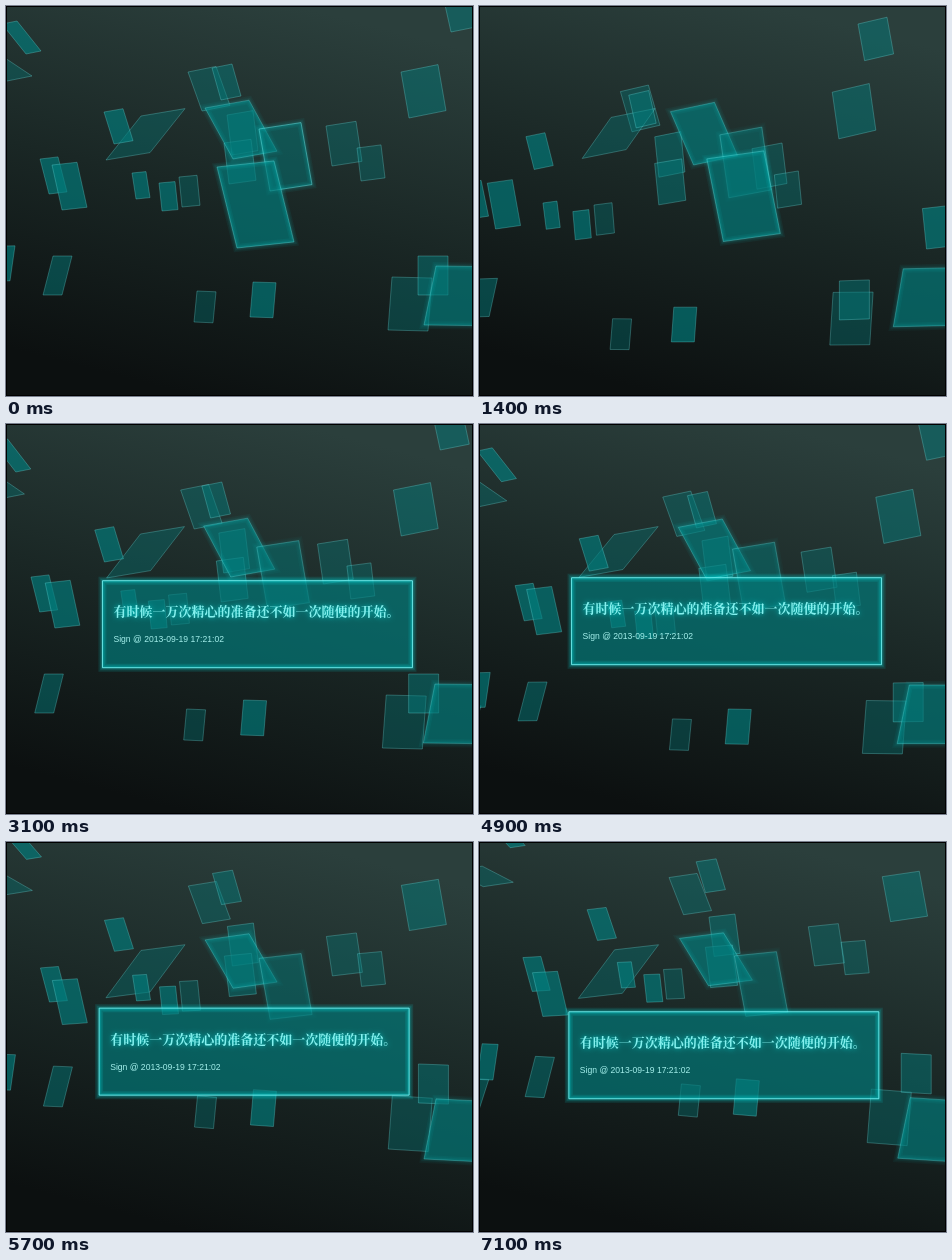
Write an HTML page with a canvas that moves like this. It is 467 px wide and 390 px high and loops after 7.4 s.

```html
<!DOCTYPE html>
<html lang="zh">
<head>
<meta charset="utf-8">
<title>Floating cards</title>
<style>
html, body { margin: 0; width: 100%; height: 100%; overflow: hidden; background: #000; }
canvas { display: block; }
</style>
</head>
<body>
<canvas id="stage" width="467" height="390"></canvas>
<script>
const W = 467, H = 390, LOOP = 7400, STEP = 100;
const ctx = document.getElementById('stage').getContext('2d');

// Tiles grouped by opacity: x, y, width, height, lean, depth
const groups = [
  { alpha: 0.35, tiles: [
    [173, 171, 18, 30, 3, 1], [182, 66, 28, 39, 14, 0.7], [320, 120, 30, 40, 6, 0.81],
    [351, 142, 24, 33, 4, 0.96], [135, 110, 44, 44, -35, 0.05], [191, 285, 19, 31, -3, 0.99],
    [386, 271, 40, 53, -4, 0.55], [-34, 56, 30, 20, 30, 0.63]] },
  { alpha: 0.46, tiles: [
    [395, 66, 37, 46, 8, 0.72], [206, 62, 20, 32, 9, 0.97],
    [221, 109, 26, 40, 5, 0.78], [218, 137, 27, 41, 5, 0.73], [412, 250, 30, 39, 0, 0.89],
    [437, -10, 29, 36, 8, 1], [47, 250, 19, 39, -10, 0.82], [-18, 273, 18, 34, -11, 0.85]] },
  { alpha: 0.64, tiles: [
    [-4, 18, 15, 30, 24, 0.9], [98, 106, 19, 32, 10, 0.88], [34, 153, 18, 35, 9, 0.86],
    [46, 159, 25, 45, 10, 0.65], [126, 167, 14, 26, 4, 1.07], [153, 177, 16, 28, 3, 1.02],
    [247, 276, 23, 35, -3, 0.9], [-7, 240, 16, 35, -5, 0.88], [484, 183, 30, 40, 5, 0.7],
    [199, 102, 44, 51, 28, 0.13], [430, 260, 54, 59, -12, 0.1]] }
];
const hovered = [253, 123, 42, 62, 11, 0.21];
const opener = [211, 161, 57, 81, 20, -0.29];

// Camera drift: time, x, y
const camera = [
  [800, 0, 0], [1000, -22, 13], [1200, -54, 31], [1300, -60, 33], [1400, -58, 28],
  [1600, -38, 6], [1800, -24, 1], [2400, -10.5, 0], [4800, -10.5, 0], [4900, 2.5, 10],
  [5100, 3, 29], [5400, 2, -3], [5600, 1, -25], [5800, 0, -38], [6000, 1, -44],
  [6400, 8, -44], [6800, 11.5, -43.5]
];

const lerp = (a, b, p) => a + (b - a) * p;

function cameraAt(t) {
  const i = camera.findIndex(k => k[0] >= t);
  if (i === 0) return [0, 0];
  if (i < 0) return camera[camera.length - 1].slice(1);
  const a = camera[i - 1], b = camera[i], p = (t - a[0]) / (b[0] - a[0]);
  return [lerp(a[1], b[1], p), lerp(a[2], b[2], p)];
}

function corners([x, y, w, h, lean, depth], [cx, cy]) {
  const low = depth + 0.003 * lean;
  const rise = w * (Math.max(-0.2, (y - 250) * 0.0012) - cy * 0.0012);
  const left = x + cx * depth, top = y + cy * depth;
  const foot = x + lean + cx * low, base = y + h + cy * low;
  return [[left, top], [left + w, top + rise], [foot + w, base + rise], [foot, base]];
}

function drawQuad(points, alpha, edge, glow) {
  ctx.beginPath();
  for (const [x, y] of points) ctx.lineTo(x, y);
  ctx.closePath();
  ctx.fillStyle = `rgba(0,127,127,${alpha})`;
  ctx.fill();
  ctx.strokeStyle = `rgba(0,255,255,${glow})`;
  if (glow) for (const width of [3, 5, 8]) {
    ctx.lineWidth = width;
    ctx.stroke();
  }
  ctx.lineWidth = 1;
  ctx.strokeStyle = `rgba(127,255,255,${edge})`;
  ctx.stroke();
}

function drawBackground() {
  const g = ctx.createLinearGradient(290, 0, 190, H);
  g.addColorStop(0, '#2b3f3c');
  g.addColorStop(0.5, '#1a2725');
  g.addColorStop(1, '#0c1010');
  ctx.fillStyle = g;
  ctx.fillRect(0, 0, W, H);
}

function drawPanel(t, view) {
  const p = Math.min(1, Math.max(0, (t - 2500) / 600));
  const x = 93.3 - 0.3 * view[0], y = 156.7 - 0.3 * view[1];
  const bulge = Math.sin(Math.PI * p);
  const top = y - 18 * bulge, bottom = y + 87 + 140 * bulge;
  const rect = [[x, top], [x + 310, top], [x + 310, bottom], [x, bottom]];
  const points = corners(opener, view)
    .map((c, i) => [lerp(c[0], rect[i][0], p), lerp(c[1], rect[i][1], p)]);
  drawQuad(points, 0.65, lerp(0.3, 0.8, p), lerp(0.05, 0.11, p));
  if (p < 1) return;

  ctx.save();
  ctx.shadowColor = 'rgba(0,255,255,0.7)';
  ctx.shadowBlur = 5;
  ctx.fillStyle = '#84f0ee';
  ctx.font = 'bold 13px "Noto Serif CJK SC", "Noto Sans CJK SC", "Noto Sans CJK", serif';
  ctx.fillText('有时候一万次精心的准备还不如一次随便的开始。', x + 11, y + 35.5);
  ctx.shadowBlur = 0;
  ctx.fillStyle = '#a5f0ec';
  ctx.font = '8.6px "Liberation Sans", Arial, sans-serif';
  ctx.fillText('Sign @ 2013-09-19 17:21:02', x + 11, y + 61.5);
  ctx.restore();
}

function draw(now) {
  const t = Math.floor((now % LOOP) / STEP) * STEP;
  const view = cameraAt(t);
  drawBackground();
  for (const { alpha, tiles } of groups)
    for (const tile of tiles)
      drawQuad(corners(tile, view), alpha, 0.25, tile[2] > 42 && tile[4] !== -35 ? 0.04 : 0);
  const hot = t < 400;
  drawQuad(corners(hovered, view), 0.46, hot ? 0.4 : 0.25, hot ? 0.05 : 0.025);
  drawPanel(t, view);
  ctx.lineWidth = 1;
  ctx.strokeStyle = '#000';
  ctx.strokeRect(0.5, 0.5, W - 1, H - 1);
}

const start = performance.now();
function tick() {
  draw(performance.now() - start);
  requestAnimationFrame(tick);
}
tick();
</script>
</body>
</html>
```
